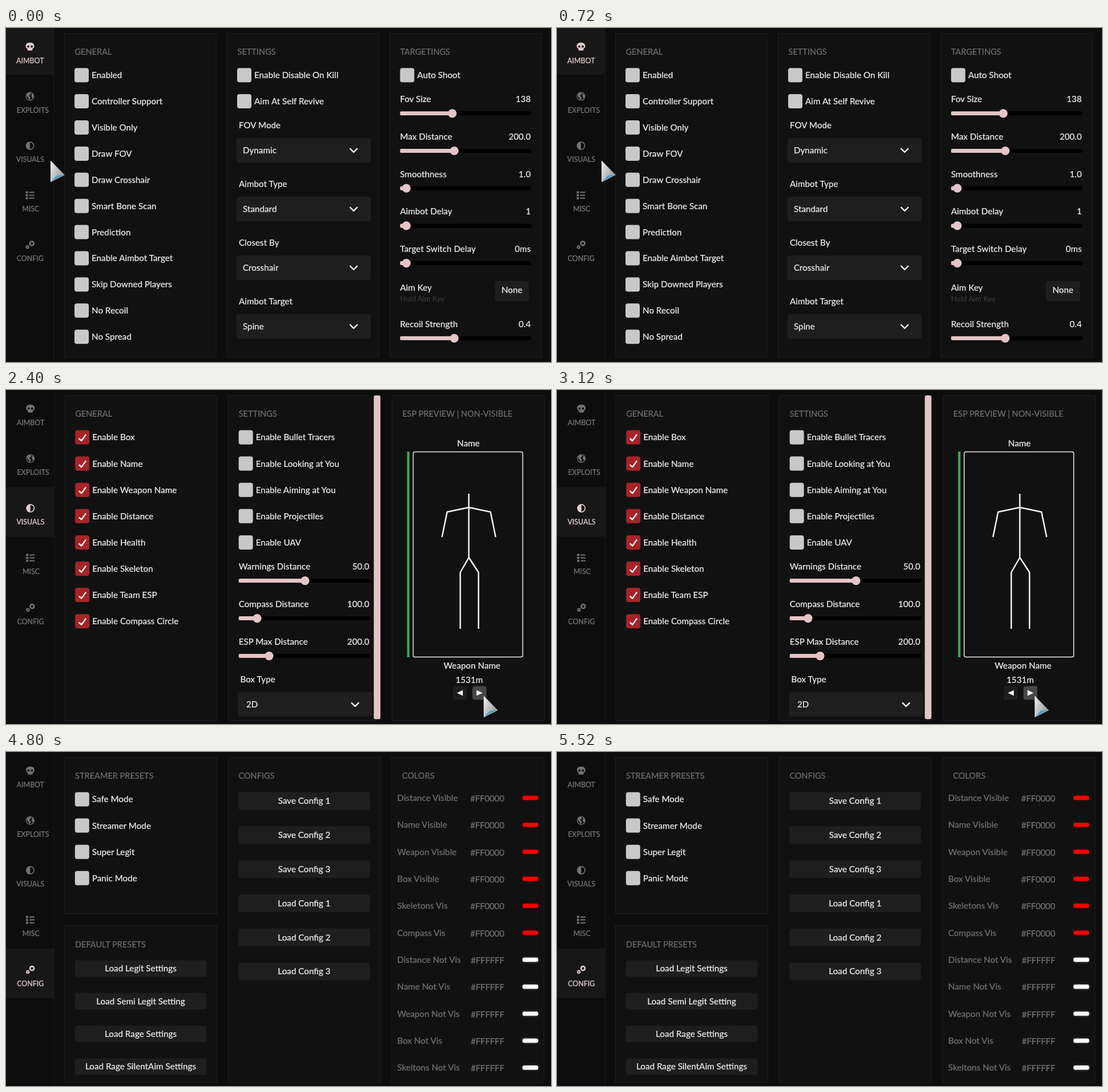
These frames come from a looping animation (955 by 586 pixels, 6000 ms). An HTML page:

```html
<!DOCTYPE html>
<html lang="en">
<head>
<meta charset="utf-8">
<title>Settings menu</title>
<style>
  html, body { margin: 0; width: 100%; height: 100%; overflow: hidden; background: #0d0d0d; }
  svg { display: block; width: 955px; height: 586px; }
  text {
    font: 500 15.2px Lato, "Open Sans", sans-serif;
    color: #e2e2e2; fill: currentColor; stroke: currentColor; stroke-width: .22px;
  }
  .head { font-size: 14.5px; color: #686868; }
  .sub { font-size: 13px; color: #363636; }
  .tab { font-size: 12.4px; color: #727272; }
  .tab.on { color: #d8c6c7; }
  .dim { color: #6c6c6c; }
  .hex { letter-spacing: -.25px; }
  .scene { visibility: hidden; animation: show 6s step-end infinite; }
  @keyframes show {
    0% { visibility: visible; }
    20%, 100% { visibility: hidden; }
  }
</style>
</head>
<body>
<svg id="stage" viewBox="0 0 955 586" xmlns="http://www.w3.org/2000/svg">
  <defs>
    <linearGradient id="silver" x1="0" y1="0" x2="1" y2="0.6">
      <stop offset="0" stop-color="#eee"/>
      <stop offset="1" stop-color="#999"/>
    </linearGradient>
    <filter id="glow" x="-50%" y="-150%" width="200%" height="400%">
      <feGaussianBlur stdDeviation="2"/>
    </filter>
    <g id="skull">
      <path fill-rule="evenodd" d="M0-7.5C4.6-7.5 7.5-4.6 7.5-1.2 7.5 1.2 6.2 2.6 4.3 3.6V6.5H-4.3V3.6C-6.2 2.6-7.5 1.2-7.5-1.2-7.5-4.6-4.6-7.5 0-7.5Z
        M-3-2.6a2 2 0 1 0 .01 0ZM3-2.6a2 2 0 1 0 .01 0Z"/>
    </g>
    <g id="globe">
      <circle r="6.9" fill="none" stroke="currentColor" stroke-width="1.3"/>
      <path d="M-6-3.5-2-6.5 1.5-5.5 1-3-1.5-1.5-1 .5 1.5 2 .5 4-1 6.5-2.5 3-5 .5ZM3-4.5 6-3 6.8 1 4.5 3.5 3 1 2.5-1.5Z"/>
    </g>
    <g id="half">
      <circle r="6.6" fill="none" stroke="currentColor" stroke-width="1.7"/>
      <path d="M0-6.6A6.6 6.6 0 0 0 0 6.6Z"/>
    </g>
    <g id="list">
      <path d="M-7.5-7h4v3.6h-4ZM-7.5-1.8h4v3.6h-4ZM-7.5 3.4h4v3.6h-4ZM-1.5-6.2h9v2h-9ZM-1.5-1h9v2h-9ZM-1.5 4.2h9v2h-9Z"/>
    </g>
    <g id="gears" fill="none" stroke="currentColor">
      <circle cx="3.2" cy="-2.2" r="3.5" stroke-width="2.6"/>
      <circle cx="-4.2" cy="4" r="2.1" stroke-width="2.2"/>
    </g>
    <g id="cursor">
      <path d="M0 0 24.500 25 0 37.500Z" fill="url(#silver)"/>
      <path d="M1.500 36.500 10.500 26.500 24 25Z" fill="#4d9dbb"/>
      <path d="M0 37.500 24.500 25" stroke="#c3d9e1" stroke-width=".8"/>
    </g>
  </defs>
  <rect width="955" height="586" fill="#0d0d0d"/>
</svg>
<script>
const stage = document.getElementById('stage');
const PINK = '#e4c5c7', FIELD = '#1e1e1e';
const TABS = [['AIMBOT', 'skull', 0], ['EXPLOITS', 'globe', 4.6], ['VISUALS', 'half', 0],
              ['MISC', 'list', 1], ['CONFIG', 'gears', 0]];
let scene;

function el(tag, attrs, content) {
  const node = document.createElementNS(stage.namespaceURI, tag);
  for (const key in attrs) node.setAttribute(key, attrs[key]);
  if (content) node.textContent = content;
  return (scene || stage).appendChild(node);
}
const rect = (x, y, width, height, fill, rx = 4) => el('rect', { x, y, width, height, fill, rx });
const line = (d, stroke, width) => el('path', {
  d, stroke, 'stroke-width': width, fill: 'none', 'stroke-linejoin': 'round' });

// Text is placed by the vertical centre of its capitals.
function text(x, y, str, cls = '', anchor = 'start') {
  const drop = cls.startsWith('tab') || cls === 'sub' ? 4.5 : 5.4;
  el('text', { x, y: y + drop, class: cls, 'text-anchor': anchor }, str);
}
const use = (id, x, y, color) => el('use', {
  href: '#' + id, transform: `translate(${x} ${y})`, fill: color, color });

function panel(x, y, w, h) {
  el('rect', { x, y, width: w, height: h, fill: '#111', stroke: '#1e1e1e' });
}
function check(x, y, label, on) {
  rect(x, y - 12.5, 25, 25, on ? '#a62428' : '#c8c8c8');
  if (on) line(`M${x + 6.5} ${y + 2}l4.500 4 8-11`, '#f4f4f4', 2.4);
  text(x + 30, y, label);
}
function checks(x, y, step, labels, on) {
  labels.forEach((label, i) => check(x, y + i * step, label, on));
}
function slider(x, y, label, value, knob) {
  text(x, y, label);
  text(x + 229, y, value, '', 'end');
  rect(x, y + 21.5, 230, 7, '#000', 2);
  rect(x, y + 21.5, knob - x, 7, PINK, 2);
  el('circle', { cx: knob, cy: y + 25, r: 7.6, fill: PINK });
}
function dropdown(x, y, label, value, inset = 10) {
  text(x + 3, y, label);
  rect(x - 1, y + 22.5, 235, 43, FIELD);
  text(x + inset, y + 43.7, value);
  line(`M${x + 197.5} ${y + 40.5}l6.700 6.700 6.700-6.700`, '#e6e6e6', 2.5);
}
function keybind(x, y, label, hint, offset = 167.5) {
  text(x, y, label);
  text(x, y + 19.5, hint, 'sub');
  rect(x + offset, y - 12, 59.5, 35.5, FIELD);
  text(x + offset + 29.7, y + 3.7, 'None', '', 'middle');
}
function button(x, y, label, h = 29) {
  rect(x, y - h / 2, 230.5, h, FIELD);
  text(x + 115.2, y, label, '', 'middle');
}

function sidebar(active, dx, y, step) {
  const top = active ? y + active * step - 37 : 0;
  rect(0, top, 84 + dx, active ? 87 : 82, '#171717', 0);
  line(`M${84.3 + dx} 0V586`, '#1b1b1b', 1);
  TABS.forEach(([name, icon, shift], i) => {
    const on = i === active, cy = y + i * step;
    use(icon, 42 + dx, cy, on ? '#e2cccd' : '#727272');
    text(42.3 + dx + shift, cy + 24.3, name, on ? 'tab on' : 'tab', 'middle');
  });
}

function aimbot() {
  sidebar(0, 0, 33, 86.8);
  [102.5, 387.5, 672.5].forEach(x => panel(x, 9.5, 265.5, 568.5));
  text(120.5, 41.5, 'GENERAL', 'head');
  text(405.5, 41.5, 'SETTINGS', 'head');
  text(690.5, 41.5, 'TARGETINGS', 'head');
  checks(120, 82.7, 45.9, ['Enabled', 'Controller Support', 'Visible Only', 'Draw FOV', 'Draw Crosshair',
    'Smart Bone Scan', 'Prediction', 'Enable Aimbot Target', 'Skip Downed Players', 'No Recoil', 'No Spread']);
  checks(405, 82.7, 45.9, ['Enable Disable On Kill', 'Aim At Self Revive']);
  [['FOV Mode', 'Dynamic'], ['Aimbot Type', 'Standard'], ['Closest By', 'Crosshair'], ['Aimbot Target', 'Spine']]
    .forEach(([label, value], i) => dropdown(405, 170.7 + i * 103, label, value));
  check(690.5, 82.7, 'Auto Shoot');
  [['Fov Size', '138', 782], ['Max Distance', '200.0', 785.5], ['Smoothness', '1.0', 701.5],
   ['Aimbot Delay', '1', 701.5], ['Target Switch Delay', '0ms', 701.5]]
    .forEach(([label, value, knob], i) => slider(690.5, 124.8 + i * 65.7, label, value, knob));
  keybind(690.5, 456, 'Aim Key', 'Hold Aim Key', 166.3);
  slider(690.5, 519.3, 'Recoil Strength', '0.4', 785.5);
  use('cursor', 78, 232.5);
}

function exploits() {
  sidebar(1, 0, 35, 87.3);
  [102.5, 389.5, 676.5].forEach(x => panel(x, 11, 267.3, 573));
  text(120.5, 43.7, 'ANTI-AIM (SPIN BOT)', 'head');
  text(407.5, 43.7, 'RISKY', 'head');
  text(695, 43.7, 'EXTRAS', 'head');
  check(120.3, 85, 'Anti Selection', true);
  dropdown(120.5, 127.5, 'Anti Aim Pitch', 'Zero');
  check(120.3, 234.7, 'Anti Aim Yaw');
  dropdown(120.5, 277.3, 'Yaw Selection', 'Zero');
  keybind(120.5, 383.3, 'Anti Aim Keybind', 'Hold Anti Aim Key');
  check(407.5, 85, 'Enable Extended Slide');
  keybind(407.5, 130, 'Extended Slide Keybind', 'Hold Slide Key');
  check(407.5, 197.3, 'Enable Long Melee');
  keybind(407.5, 242.2, 'Long Melee', 'Hold Choosen Key');
  keybind(407.5, 308.3, 'Air Stuck Keybind', 'Hold Choosen Key');
  button(407.8, 377.3, 'Unlock All');
  checks(694.7, 85, 46.2, ['Skip Vehicles', 'Draw Prediction Circle', 'Aim At Team(FFA)', 'Auto Wall']);
  use('cursor', 678, 401);
}

function visuals() {
  sidebar(2, 0.7, 33, 87.2);
  [103, 389.5, 676.5].forEach(x => panel(x, 9.5, 267, 571));
  text(121.3, 41.7, 'GENERAL', 'head');
  text(407.7, 41.7, 'SETTINGS', 'head');
  text(694.5, 41.7, 'ESP PREVIEW | NON-VISIBLE', 'head');
  checks(121.2, 83, 46.1, ['Enable Box', 'Enable Name', 'Enable Weapon Name', 'Enable Distance',
    'Enable Health', 'Enable Skeleton', 'Enable Team ESP', 'Enable Compass Circle'], true);
  checks(407.7, 83, 46.1, ['Enable Bullet Tracers', 'Enable Looking at You', 'Enable Aiming at You',
    'Enable Projectiles', 'Enable UAV']);
  [['Warnings Distance', '50.0', 524], ['Compass Distance', '100.0', 440], ['ESP Max Distance', '200.0', 461]]
    .forEach(([label, value, knob], i) => slider(407.7, 309.6 + i * 66, label, value, knob));
  dropdown(407.5, 507.8, 'Box Type', '2D', 13.5);
  rect(644.5, 9.5, 11.5, 568, PINK, 3);

  text(810.3, 94, 'Name', '', 'middle');
  rect(702.8, 108, 4.2, 361, '#37a852', 0);
  el('rect', { x: 713.5, y: 108.5, width: 192, height: 360, rx: 3, fill: 'none', stroke: '#eee', 'stroke-width': 1.5 });
  line('M811 182V294M764 258 773 214 811 206 849 214 858 258M796 419V320L811 294 828 320V419', '#f2f2f2', 2.5);
  text(816.5, 484, 'Weapon Name', '', 'middle');
  text(811.7, 509, '1531m', '', 'middle');
  rect(783, 519.5, 24.5, 24, FIELD);
  rect(817.3, 519.5, 24.5, 24, '#474747');
  el('path', { d: 'M800.500 526.500v10l-10.500-5ZM824.500 526.500v10l10.500-5Z', fill: '#f2f2f2' });
  use('cursor', 837, 536.5);
}

function misc() {
  sidebar(3, -1.4, 33, 87.3);
  [101, 388.2, 675.4].forEach(x => panel(x, 9.5, 267.3, 572));
  text(119.3, 41.7, 'MAIN', 'head');
  text(406.3, 41.7, 'EXPLOITS', 'head');
  text(693.5, 41.7, 'OUTLINES/CHAMS', 'head');
  check(119.2, 83, 'Enable Player Fov');
  slider(119.5, 125.5, 'Player Fov', '134.9', 288.5);
  check(119.2, 195.3, 'Third Person');
  checks(406.3, 83, 46.2, ['Draw FPS', 'Remove Game Crosshair', 'Remove Your Guns/Arms',
    'Remove Riot Shield Shake', 'Break Camera', 'Remove Fog', 'Heartbeat Cheat']);
  button(406.3, 408, 'Leave Match');
  checks(693.5, 83, 46.2, ['Outlines Off/On', 'Enable Player Outlines', 'Enable Vehicle Outlines']);
}

function config() {
  sidebar(4, 0.4, 33, 87.2);
  panel(102.5, 9.5, 267, 274.5);
  panel(102.5, 304, 267, 275.5);
  panel(389.5, 9.5, 267, 571);
  panel(675.7, 9.5, 267, 571);
  text(121, 41.7, 'STREAMER PRESETS', 'head');
  text(121, 337.3, 'DEFAULT PRESETS', 'head');
  text(407.5, 41.7, 'CONFIGS', 'head');
  text(694, 41.7, 'COLORS', 'head');
  checks(120.8, 83, 46.1, ['Safe Mode', 'Streamer Mode', 'Super Legit', 'Panic Mode']);
  ['Legit Settings', 'Semi Legit Setting', 'Rage Settings', 'Rage SilentAim Settings']
    .forEach((name, i) => button(120.8, 380 + i * 57.3, 'Load ' + name));
  for (let i = 0; i < 6; i++)
    button(407.3, 86 + i * 59.8, `${i < 3 ? 'Save' : 'Load'} Config ${i % 3 + 1}`, 31);
  ['Distance Visible', 'Name Visible', 'Weapon Visible', 'Box Visible', 'Skeletons Vis', 'Compass Vis',
   'Distance Not Vis', 'Name Not Vis', 'Weapon Not Vis', 'Box Not Vis', 'Skeltons Not Vis']
    .forEach((label, i) => {
      const y = 80.5 + i * 47.33, color = i < 6 ? '#FF0000' : '#FFFFFF';
      text(685.5, y, label, 'dim');
      text(873, y + 1, color, 'dim hex', 'end');
      const halo = rect(905, y - 3.5, 27.5, 7, color);
      halo.setAttribute('filter', 'url(#glow)');
      halo.setAttribute('opacity', 0.3);
      rect(905, y - 3.7, 27.5, 7.4, color, 3);
    });
}

[aimbot, exploits, visuals, misc, config].forEach((draw, i) => {
  scene = null;
  scene = el('g', { class: 'scene', style: `animation-delay:${i * 1200 - 6000}ms` });
  draw();
});
</script>
</body>
</html>
```
